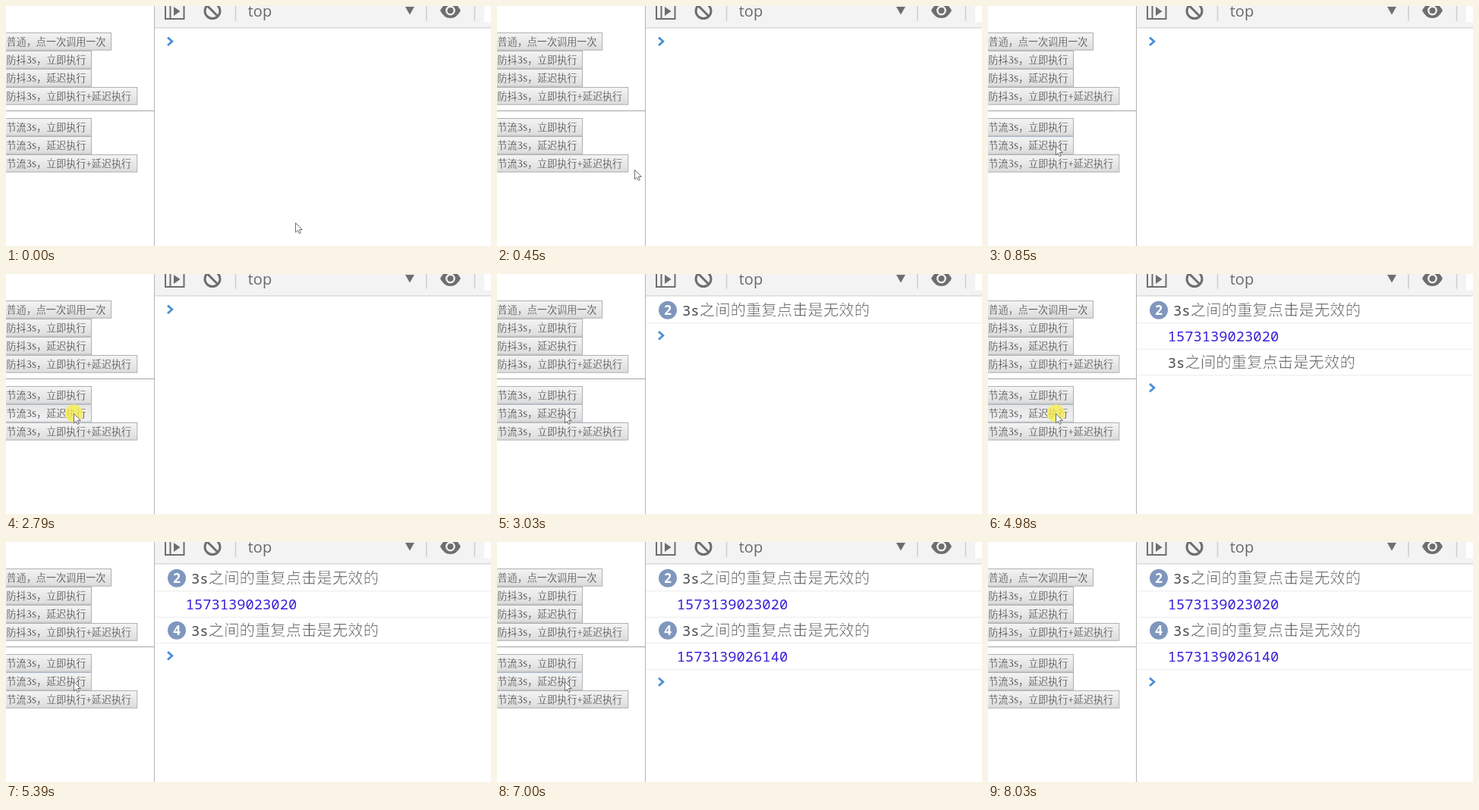
These frames come from a looping animation (639x317 px, 8420 ms). An HTML page:

```html
<!DOCTYPE html>
<html lang="zh">
<head>
<meta charset="utf-8">
<style>
  html, body { margin: 0; width: 100%; height: 100%; overflow: hidden; background: #fff; }
  svg { display: block; width: 639px; height: 317px; }
  /* A thin background-coloured stroke slims the glyphs. */
  .label { font: 13.1px "Noto Sans CJK SC", "Noto Sans CJK", sans-serif; fill: #303030; stroke: #ebebeb; stroke-width: .3px; }
  .log { font: 300 20.4px "Noto Sans CJK SC", "Noto Sans CJK", sans-serif; fill: #505050; stroke: #fff; stroke-width: .65px; }
  .mono { font: 18.8px "Noto Sans Mono", monospace; }
  .stamp { fill: #3620d6; }
  .count { font: bold 17px "Open Sans", sans-serif; fill: #fff; text-anchor: middle; }
  .top { font: 20px "Open Sans", sans-serif; fill: #686868; }
</style>
</head>
<body>
<svg id="stage" viewBox="0 0 639 317">
  <defs>
    <linearGradient id="face" x2="0" y2="1"><stop stop-color="#f4f4f4"/><stop offset="1" stop-color="#dcdcdc"/></linearGradient>
    <linearGradient id="down" x2="0" y2="1"><stop stop-color="#e6e6e6"/><stop offset="1" stop-color="#f1f1f1"/></linearGradient>
  </defs>
  <rect width="639" height="317" fill="#fff"/>
  <g id="buttons"></g>
  <path d="M0 138.5H195" stroke="#a4a4a4"/>
  <path d="M195.5 0V317" stroke="#b4b4b4"/>

  <rect x="196" width="443" height="28.5" fill="#f3f3f3"/>
  <path d="M196 28.9H639" stroke="#cbcbcb"/>
  <g fill="none" stroke="#6e6e6e">
    <path d="M210 -4V17H234.5V-4M216.5 -4V17" stroke-width="2"/>
    <circle cx="272" cy="6.5" r="10" stroke-width="3"/>
    <path d="M265 -.5L279 13.5" stroke-width="3"/>
  </g>
  <path d="M221 1V13L229.500 7Z M526 1H538L532 11.500Z" fill="#6e6e6e"/>
  <path d="M302.500 0V19.500M554 0V19.500M617.500 0V19.500" stroke="#cdcdcd" stroke-width="1.500"/>
  <text class="top" x="318.800" y="14.300">top</text>
  <path d="M572 6Q577 -4 585.500 -4T599 6Q594 16 585.500 16T572 6Z" fill="#6e6e6e"/>
  <circle cx="585.500" cy="6" r="5.200" fill="none" stroke="#f3f3f3" stroke-width="2.400"/>
  <rect x="630" width="9" height="21.500" fill="#fff"/>

  <g id="rows"></g>
  <path id="prompt" d="M213 -5.200L218.800 0L213 5.200" fill="none" stroke="#4a8fd6" stroke-width="2.800"/>
  <circle id="spot" cx="89.500" cy="184" r="11.700" fill="#f8ee50" opacity=".8"/>
  <path id="cursor" d="M.5 .5V13L3.400 10.300L5.300 14.500L7.300 13.600L5.400 9.500H9.300Z" fill="#fff" stroke="#606060" stroke-width=".9"/>
</svg>
<script>
const LOOP = 8420, PITCH = 34.5;
const NOTE = "之间的重复点击是无效的";
const HOME = [381, 286], TARGET = [89, 184], EXIT = [598, 308];
const PRESSES = [[770, 850], [2790, 2880], [2950, 3030], [3820, 3970], [4050, 4210],
                 [4980, 5060], [5140, 5220], [5300, 5390]];
const ROWS = [
  { hits: [2880, 3030] },
  { at: 3890, stamp: "1573139023020" },
  { hits: [4210, 5060, 5220, 5390] },
  { at: 7000, stamp: "1573139026140" }
];
const $ = id => document.getElementById(id);

function add(parent, tag, attrs, text = "") {
  const el = document.createElementNS("http://www.w3.org/2000/svg", tag);
  for (const key in attrs) el.setAttribute(key, attrs[key]);
  el.textContent = text;
  return parent.appendChild(el);
}

function addButton(y, right, text) {
  const box = add($("buttons"), "rect", {
    x: -5, y: y + .5, width: right + 4.5, height: 22.7, fill: "url(#face)", stroke: "#b0b0b0"
  });
  add($("buttons"), "text", { class: "label", x: .5, y: y + 17.3 }, text);
  return box;
}

addButton(35, 139, "普通，点一次调用一次");
const modes = [["立即执行", 113], ["延迟执行", 113], ["立即执行+延迟执行", 173.3]];
const addGroup = (top, name) => modes.map(([mode, right], i) =>
  addButton(top + 24 * i, right, `${name}3s，${mode}`));
addGroup(59, "防抖");
const active = addGroup(148, "节流")[1];

ROWS.forEach((row, i) => {
  const y = PITCH * i;
  row.group = add($("rows"), "g", {});
  add(row.group, "path", { d: `M196 ${64.8 + y}H639`, stroke: "#ebebeb" });
  if (row.stamp) {
    add(row.group, "text", { class: "mono stamp", x: 236.7, y: 54.8 + y }, row.stamp);
    return;
  }
  row.at = row.hits[0];
  row.badge = add(row.group, "g", {});
  add(row.badge, "circle", { cx: 225, cy: 47.8 + y, r: 12, fill: "#7f97bd" });
  row.count = add(row.badge, "text", { class: "count", x: 225, y: 54 + y });
  row.text = add(row.group, "g", {});
  add(row.text, "text", { class: "mono", x: 0, y: 55 + y, fill: "#4a4a4a" }, "3s");
  add(row.text, "text", { class: "log", x: 22.8, y: 55.2 + y }, NOTE);
});

const show = (el, on) => el.setAttribute("display", on ? "inline" : "none");
const mix = (a, b, p) => a.map((v, i) => v + (b[i] - v) * p);
const smooth = p => p * p * (3 - 2 * p);

function steps(t, from, to, count) {
  return t < from ? 0 : Math.min(count, 1 + Math.floor((t - from) / (to - from) * (count - 1) + .01));
}

function pointerAt(t) {
  if (t < 7400) return mix(HOME, TARGET, smooth(steps(t, 70, 620, 8) / 8));
  const p = steps(t, 7400, 8030, 9) / 8;
  return p > 1 ? null : mix(TARGET, EXIT, smooth(p));
}

function draw(t) {
  const pos = pointerAt(t);
  const pressed = PRESSES.some(([from, to]) => t >= from && t < to);
  const hover = pos && pos[0] < 113 && pos[1] >= 172 && pos[1] < 196;

  show($("cursor"), pos);
  if (pos) $("cursor").setAttribute("transform", `translate(${pos.map(Math.round)})`);
  show($("spot"), pressed);
  active.setAttribute("fill", pressed ? "url(#down)" : "url(#face)");
  active.setAttribute("stroke", hover ? "#adb9c4" : "#b0b0b0");

  let shown = 0;
  for (const row of ROWS) {
    const on = t >= row.at;
    show(row.group, on);
    if (on) shown++;
    if (!row.hits) continue;
    const n = row.hits.filter(hit => t >= hit).length;
    show(row.badge, n > 1);
    row.count.textContent = n;
    row.text.setAttribute("transform", `translate(${n > 1 ? 244 : 236.7})`);
  }
  $("prompt").setAttribute("transform", `translate(0 ${46.8 + PITCH * shown})`);
}

function tick() {
  draw(performance.now() % LOOP);
  requestAnimationFrame(tick);
}
tick();
</script>
</body>
</html>
```
